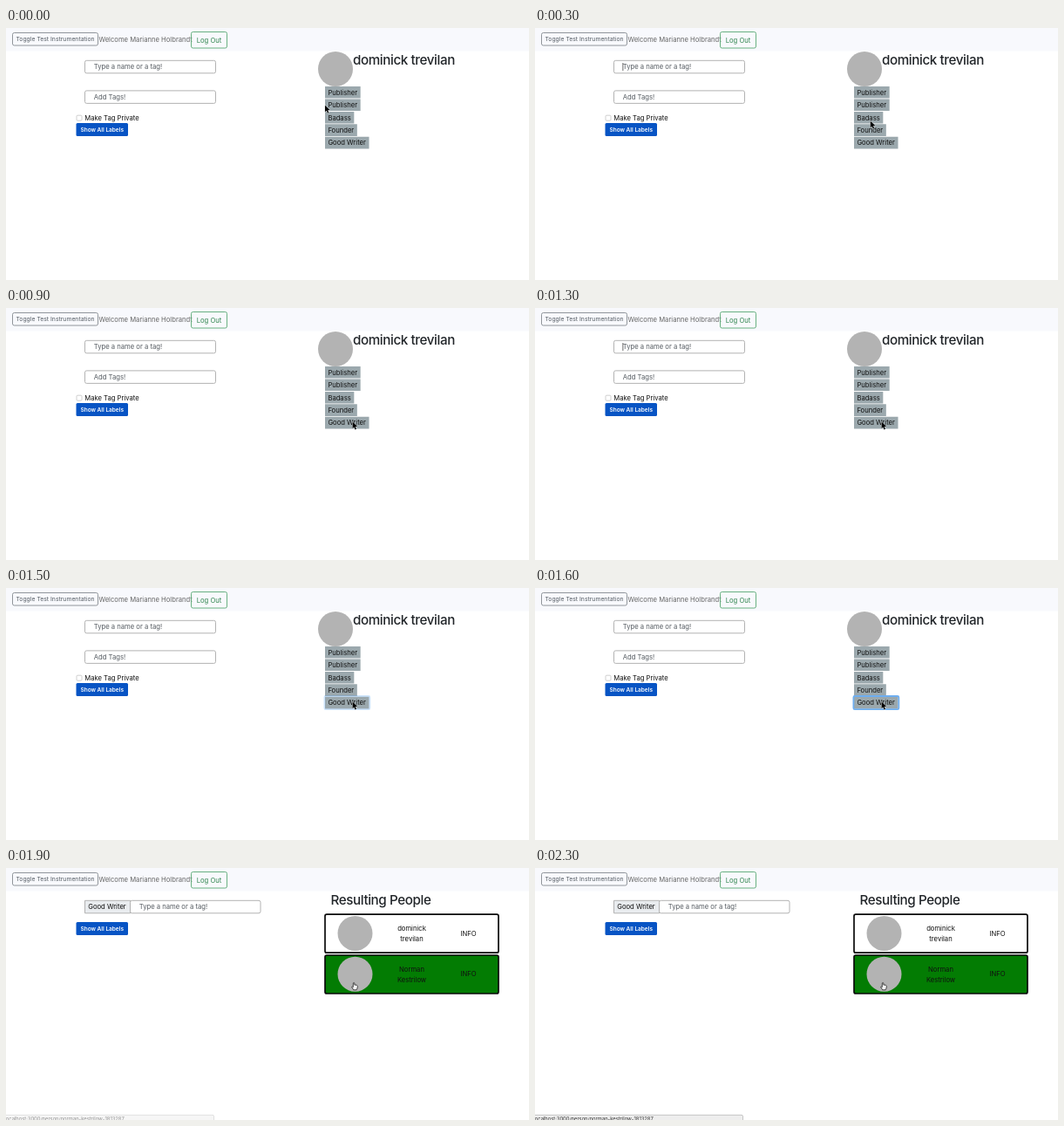
Recreate the animation shown at these times as an HTML page with a canvas. Size 600 px wide and 289 px high, loop 2400 ms.

```html
<!DOCTYPE html>
<html lang="en">
<head>
<meta charset="utf-8">
<title>People and tags</title>
<style>
  html, body { margin: 0; width: 100%; height: 100%; overflow: hidden; background: #fff; }
  canvas { display: block; width: 600px; height: 289px; }
</style>
</head>
<body>
<canvas id="stage"></canvas>
<script>
const WIDTH = 600, HEIGHT = 289, LOOP = 2400, STEP = 100;
const BODY = 7.65;
const canvas = document.getElementById('stage');
const ctx = canvas.getContext('2d');
const ratio = window.devicePixelRatio || 1;
canvas.width = Math.round(WIDTH * ratio);
canvas.height = Math.round(HEIGHT * ratio);

const clamp01 = v => Math.max(0, Math.min(1, v));
const progress = (t, start, end) => clamp01((t - start) / (end - start));

function text(str, x, y, { size = BODY, weight = 400, color = '#111', align = 'left', spacing = 0 } = {}) {
  ctx.font = `${weight} ${size}px Inter, "Liberation Sans", sans-serif`;
  ctx.letterSpacing = `${spacing}px`;
  ctx.textAlign = align;
  ctx.fillStyle = color;
  ctx.fillText(str, x, y);
  return ctx.measureText(str).width;
}

function box(x, y, w, h, { fill, stroke, line = 1, radius = 0 }) {
  ctx.beginPath();
  ctx.roundRect(x, y, w, h, radius);
  if (fill) { ctx.fillStyle = fill; ctx.fill(); }
  if (stroke) { ctx.strokeStyle = stroke; ctx.lineWidth = line; ctx.stroke(); }
}

function avatar(x, y) {
  ctx.beginPath();
  ctx.arc(x, y, 20, 0, Math.PI * 2);
  ctx.fillStyle = '#b3b3b3';
  ctx.fill();
}

function heading(str, x) {
  text(str, x, 42.3, { size: 15.2, weight: 500, color: '#212529', spacing: -0.4 });
}

function field(x, y, w, placeholder) {
  box(x, y, w, 14.5, { fill: '#fff', stroke: '#b2b2b2', radius: 2 });
  text(placeholder, x + 10.3, y + 9.9, { color: '#555b61' });
}

function showAll(y) {
  box(80.5, y, 59.5, 15, { fill: '#0754c4', radius: 1.5 });
  text('Show All Labels', 110.2, y + 9.9, { size: 6.5, weight: 600, color: '#fff', align: 'center' });
}

function navbar() {
  box(0, 0, WIDTH, 26.5, { fill: '#f8f9fd' });
  box(7.5, 5.5, 98, 14.5, { stroke: '#858b90', line: 0.9, radius: 2 });
  text('Toggle Test Instrumentation', 56.5, 15.3, { size: 6.85, color: '#555c63', align: 'center' });
  text('Welcome Marianne Holbrandt', 106.5, 15.6, { color: '#666' });
  box(212.5, 4.5, 41, 18.5, { stroke: '#58a973', line: 0.9, radius: 2 });
  text('Log Out', 233, 16.7, { color: '#328650', align: 'center' });
}

function arrow(x, y) {
  const points = [[0, 0], [0, 7.6], [1.8, 6], [3, 8.8], [4.3, 8.2], [3.1, 5.5], [5.5, 5.4]];
  ctx.beginPath();
  points.forEach(([dx, dy]) => ctx.lineTo(x + dx, y + dy));
  ctx.closePath();
  ctx.strokeStyle = '#dde1e3';
  ctx.lineWidth = 0.9;
  ctx.stroke();
  ctx.fillStyle = '#000';
  ctx.fill();
}

function hand(x, y) {
  ctx.beginPath();
  ctx.moveTo(x, y + 5);
  ctx.lineTo(x, y + 0.7);
  ctx.quadraticCurveTo(x + 0.8, y - 0.6, x + 1.5, y + 0.7);
  ctx.lineTo(x + 1.6, y + 2.9);
  ctx.quadraticCurveTo(x + 4.8, y + 2.5, x + 5, y + 4.2);
  ctx.quadraticCurveTo(x + 5.2, y + 6.8, x + 3.8, y + 8.6);
  ctx.lineTo(x + 0.4, y + 8.6);
  ctx.lineTo(x - 1.7, y + 5.2);
  ctx.quadraticCurveTo(x - 1.4, y + 4, x, y + 5.4);
  ctx.closePath();
  ctx.fillStyle = '#f4f4f4';
  ctx.fill();
  ctx.strokeStyle = '#222';
  ctx.lineWidth = 0.8;
  ctx.stroke();
}

function pointerAt(t) {
  const path = [[0, 366, 88.7], [500, 397.3, 118.6], [600, 397.6, 125], [800, 397.6, 130.6]];
  for (let i = 1; i < path.length; i++) {
    const [t0, x0, y0] = path[i - 1], [t1, x1, y1] = path[i];
    if (t <= t1) {
      const p = progress(t, t0, t1);
      return [x0 + (x1 - x0) * p, y0 + (y1 - y0) * p];
    }
  }
  return path[path.length - 1].slice(1);
}

function profilePage(t) {
  field(90.5, 37.3, 150, 'Type a name or a tag!');
  field(90.5, 71.9, 150, 'Add Tags!');
  const caretOn = (t >= 300 && t < 800) || (t >= 1300 && t < 1500);
  if (caretOn) box(100.5, 40, 0.8, 9, { fill: '#444' });

  box(81, 100.2, 6, 6, { fill: '#fff', stroke: '#c4c4c4', line: 0.8, radius: 1 });
  text('Make Tag Private', 90.3, 105.8);
  showAll(109);

  avatar(378, 47);
  heading('dominick trevilan', 398);
  ['Publisher', 'Publisher', 'Badass', 'Founder', 'Good Writer'].forEach((tag, i) => {
    const y = 67 + i * 14.45;
    ctx.font = `400 ${BODY}px Inter, "Liberation Sans", sans-serif`;
    ctx.letterSpacing = '0px';
    const w = ctx.measureText(tag).width + 7;
    box(366, y, w, 13.6, { fill: '#9ba8ad' });
    text(tag, 369.4, y + 9.6);
    if (i === 4) {
      ctx.globalAlpha = progress(t, 1450, 1600);
      box(365.4, y - 0.8, w + 1.4, 15.2, { stroke: '#6eaef0', line: 1.8, radius: 1.5 });
      ctx.globalAlpha = 1;
    }
  });
  arrow(...pointerAt(t));
}

function personCard(y, first, last, fill) {
  box(366, y, 199, 44, { fill, stroke: '#0a0a0a', line: 1.7, radius: 2 });
  avatar(400.5, y + 21.7);
  text(first, 465.5, y + 18.5, { align: 'center' });
  text(last, 465.5, y + 30.5, { align: 'center' });
  text('INFO', 530.5, y + 24.4, { align: 'center' });
}

function resultsPage(t) {
  box(90.5, 37.3, 52, 14.5, { fill: '#e9ecef', stroke: '#b2b2b2' });
  text('Good Writer', 94.2, 47.2);
  field(142.5, 37.3, 149.5, 'Type a name or a tag!');
  showAll(62);

  heading('Resulting People', 372.5);
  personCard(53.2, 'dominick', 'trevilan', '#fff');
  personCard(100, 'Norman', 'Kestrilow', '#037c03');
  hand(398.3, 131.2);

  ctx.globalAlpha = progress(t, 1800, 2000);
  box(-2, 283.3, 240.5, 10, { fill: '#eeeeee', stroke: '#b9b9b9', line: 0.8, radius: 1.5 });
  text('localhost:3000/person/norman-kestrilow-1813287', -1.6, 290, { size: 5.8, color: '#333' });
  ctx.globalAlpha = 1;
}

function draw(now) {
  const t = Math.floor((now % LOOP) / STEP) * STEP;
  ctx.setTransform(ratio, 0, 0, ratio, 0, 0);
  box(0, 0, WIDTH, HEIGHT, { fill: '#fff' });
  navbar();
  if (t < 1700) profilePage(t);
  else resultsPage(t);
}

const start = performance.now();
function tick() {
  draw(performance.now() - start);
  requestAnimationFrame(tick);
}
tick();
</script>
</body>
</html>
```
